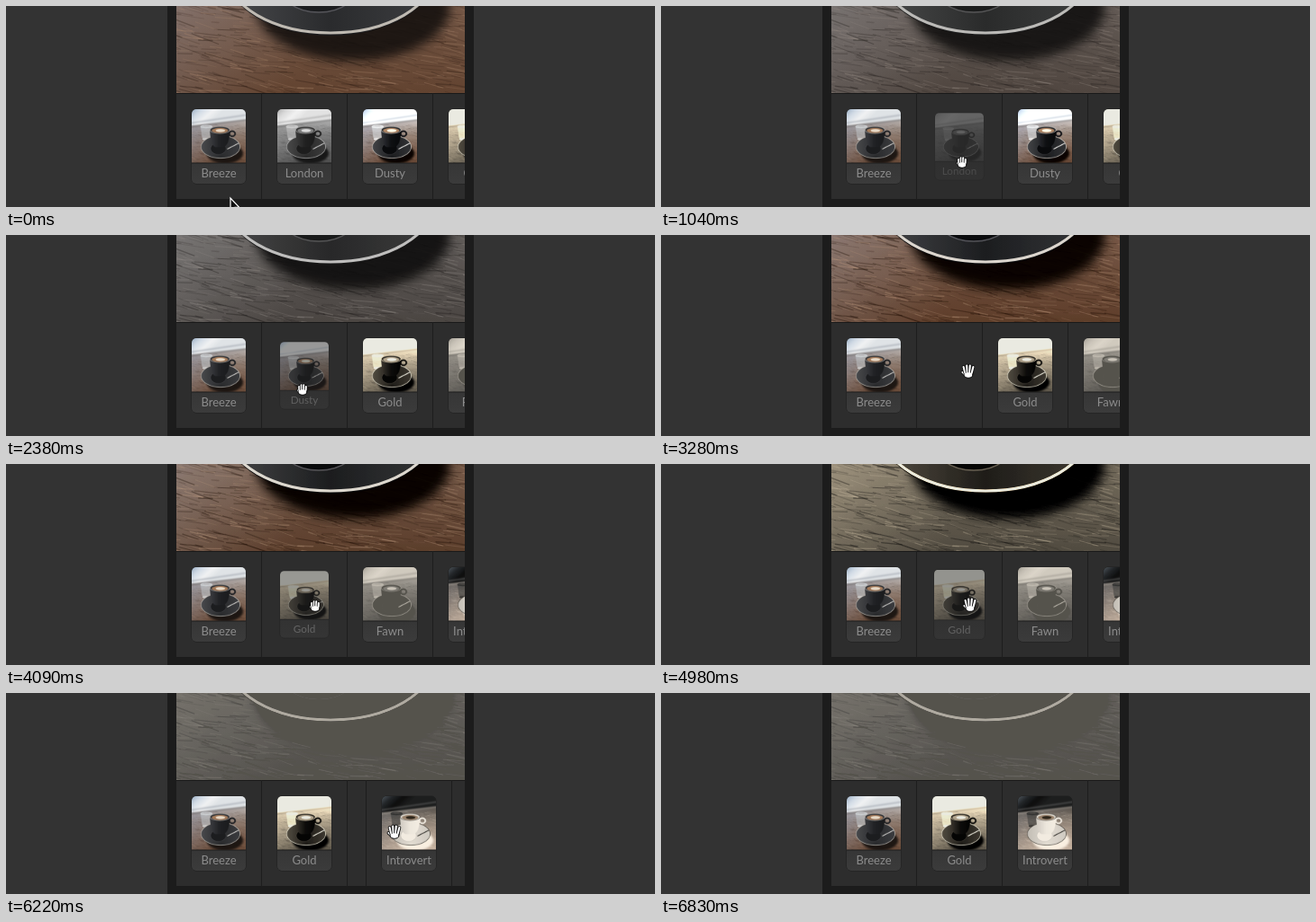
An HTML page with a canvas that plays this animation: 720x224 px, repeating every 7.36 s.

```html
<!DOCTYPE html>
<html lang="en">
<head>
<meta charset="utf-8">
<title>Photo filter strip</title>
<style>
  html, body { margin: 0; width: 100%; height: 100%; overflow: hidden; background: #333; }
  canvas { display: block; }
</style>
</head>
<body>
<canvas id="stage" width="720" height="224"></canvas>
<script>
const LOOP = 7360, LEFT = 189, TOP = 97, SLOT = 95, PHOTO_W = 320, PHOTO_H = 358;
const ctx = document.getElementById('stage').getContext('2d');
ctx.imageSmoothingQuality = 'high';

// press: picked; release: let go and kept; out: fades away; fold: its slot closes
const tiles = [
  { name: 'Breeze', filter: 'none' },
  { name: 'London', filter: 'grayscale(1)', press: 860, out: 1130, fold: 1346 },
  { name: 'Dusty', filter: 'brightness(1.08) contrast(1.2) saturate(.8)', press: 2290, out: 2920, fold: 3193 },
  { name: 'Gold', filter: 'grayscale(1) brightness(1.2) contrast(1.3) sepia(.6) brightness(.92)',
    press: 4010, release: 4940 },
  { name: 'Fawn', filter: 'grayscale(1) brightness(1.05) contrast(.8) sepia(.22) brightness(.9)', floor: '#55534c',
    press: 5610, out: 5870, fold: 6025 },
  { name: 'Introvert', filter: 'invert(1) hue-rotate(180deg) saturate(.6) sepia(.2)' }
];

// time, x, y of the pointer
const path = [
  [90, 254, 222], [360, 330, 168], [590, 330, 168], [680, 334, 173], [1660, 334, 173],
  [2020, 329, 171], [2920, 329, 171], [3190, 341, 152], [3370, 341, 152], [3460, 343, 157],
  [4980, 343, 157], [5430, 431, 155], [6310, 431, 155], [6740, 485, 197]
];

const clamp = v => Math.max(0, Math.min(1, v));
const ramp = (t, start, length) => start === undefined ? 0 : clamp((t - start) / length);
const ease = u => u * u * (3 - 2 * u);

function randomizer(seed) {
  return () => (seed = (seed * 16807) % 2147483647) / 2147483647;
}

function newCanvas() {
  const canvas = document.createElement('canvas');
  canvas.width = PHOTO_W;
  canvas.height = PHOTO_H;
  return [canvas, canvas.getContext('2d')];
}

function gradient(c, x0, y0, x1, y1, ...colors) {
  const g = c.createLinearGradient(x0, y0, x1, y1);
  colors.forEach((color, i) => g.addColorStop(i / (colors.length - 1), color));
  return g;
}

function polygon(c, points, fill) {
  c.beginPath();
  points.forEach(p => c.lineTo(...p));
  c.closePath();
  c.fillStyle = fill;
  c.fill();
}

function ellipse(c, x, y, rx, ry, fill, stroke, width) {
  c.beginPath();
  c.ellipse(x, y, rx, ry, 0, 0, 7);
  if (fill) { c.fillStyle = fill; c.fill(); }
  if (stroke) { c.strokeStyle = stroke; c.lineWidth = width; c.stroke(); }
}

function line(c, x0, y0, x1, y1, color, width) {
  c.beginPath();
  c.moveTo(x0, y0);
  c.lineTo(x1, y1);
  c.strokeStyle = color;
  c.lineWidth = width;
  c.stroke();
}

function paintPhoto() {
  const [canvas, c] = newCanvas();
  const rand = randomizer(71);
  c.lineCap = 'round';

  // table, paler towards the window on the left
  c.fillStyle = gradient(c, 0, 60, 0, PHOTO_H, '#b9b3b0', '#8d7a6e', '#755847', '#624330');
  c.fillRect(0, 0, PHOTO_W, PHOTO_H);
  c.fillStyle = gradient(c, 0, 150, 170, 290, 'rgba(150,152,165,.6)', 'rgba(150,140,140,0)');
  c.fillRect(0, 0, PHOTO_W, PHOTO_H);
  for (let i = 0; i < 1500; i++) {
    const x = rand() * 350 - 30, y = 90 + rand() * 270, length = 6 + rand() * 26;
    const shade = rand() < .6 ? '36,22,14' : '178,142,114';
    const rise = length * (rand() * .4);
    line(c, x, y, x + length, y + rise, `rgba(${shade},${.1 + rand() * .25})`, .5 + rand());
  }

  // window
  c.filter = 'blur(4px)';
  polygon(c, [[-10, -10], [330, -10], [330, 62], [-10, 100]],
    gradient(c, 0, 0, 90, 100, '#9db1c8', '#d3dce6', '#f1f2f3', '#dfe3e6'));
  line(c, -10, 84, 330, 34, '#a3a9b2', 6);
  line(c, -10, 104, 330, 64, '#6d6a6a', 5);
  c.filter = 'none';

  // glass
  polygon(c, [[52, 104], [122, 104], [112, 182], [64, 182]], 'rgba(205,212,218,.45)');
  ellipse(c, 87, 104, 35, 8, 'rgba(235,240,243,.4)', '#d5dbdf', 3);
  ellipse(c, 88, 178, 24, 8, 'rgba(235,235,235,.5)');

  // saucer with its shadow
  c.filter = 'blur(6px)';
  ellipse(c, 196, 262, 108, 60, 'rgba(22,17,15,.9)');
  c.filter = 'none';
  ellipse(c, 171, 225, 116, 69, '#1b1b1d');
  ellipse(c, 171, 224, 115, 67, gradient(c, 56, 0, 286, 0, '#48494c', '#2a2b2d', '#3c3d40'));
  ellipse(c, 171, 224, 115, 67, null, '#bfbab2', 3);
  ellipse(c, 158, 234, 46, 34, '#1c1d1f', '#55555a', 1.5);

  // cup
  ellipse(c, 240, 146, 17, 15, null, '#222326', 9);
  c.beginPath();
  c.moveTo(108, 124);
  c.bezierCurveTo(110, 190, 122, 220, 142, 226);
  c.lineTo(186, 226);
  c.bezierCurveTo(210, 218, 224, 190, 226, 124);
  c.fillStyle = gradient(c, 108, 0, 226, 0, '#3b3c40', '#202124', '#1a1b1d');
  c.fill();
  ellipse(c, 167, 124, 58, 21, '#35363a', '#a5a29d', 3);
  ellipse(c, 167, 127, 48, 15, '#a37a5a');
  ellipse(c, 170, 127, 28, 9, '#e6d8c6');

  // spoon
  line(c, 212, 236, 278, 202, '#cfcdca', 5);
  return canvas;
}

function develop(photo, { filter, floor }) {
  const [canvas, c] = newCanvas();
  c.filter = filter;
  c.drawImage(photo, 0, 0);
  c.filter = 'none';
  if (floor) {
    c.globalCompositeOperation = 'lighten';
    c.fillStyle = floor;
    c.fillRect(0, 0, PHOTO_W, PHOTO_H);
  }
  return canvas;
}

function rect(x, y, w, h, fill) {
  ctx.fillStyle = fill;
  ctx.fillRect(x, y, w, h);
}

function drawMain(t) {
  tiles.forEach((tile, i) => {
    ctx.globalAlpha = i ? ease(ramp(t, tile.press && tile.press + 30, 240)) : 1;
    ctx.drawImage(tile.image, LEFT, TOP - PHOTO_H);
  });
  ctx.globalAlpha = 1;
}

function drawTile(tile, x, t) {
  const back = ramp(t, tile.release, 120);
  const shrink = ramp(t, tile.press, 80) * (1 - back);
  const dim = ramp(t, tile.press, 130) * (1 - back);
  const alpha = (1 - .7 * dim) * (1 - ramp(t, tile.out, 150));
  if (!alpha) return;
  const scale = 1 - .1 * shrink;
  ctx.save();
  ctx.globalAlpha = alpha;
  ctx.translate(x + 47, 156.5);
  ctx.scale(scale, scale);
  ctx.beginPath();
  ctx.roundRect(-30, -41.5, 60, 83, 5);
  ctx.strokeStyle = '#1f1f1f';
  ctx.lineWidth = 1;
  ctx.stroke();
  ctx.clip();
  ctx.drawImage(tile.image, 0, 0, PHOTO_W, PHOTO_W, -30, -41.5, 60, 60);
  rect(-30, 18.5, 60, 24, gradient(ctx, 0, 18, 0, 42, '#363636', '#3b3b3b'));
  rect(-30, 18, 60, 1, '#1d1d1d');
  ctx.font = '13px Lato, sans-serif';
  ctx.textAlign = 'center';
  ctx.fillStyle = '#8c8c8c';
  ctx.fillText(tile.name, 0, 34.5);
  ctx.restore();
}

function drawStrip(t) {
  rect(LEFT, TOP, 320, 118, '#2d2d2d');
  rect(LEFT, TOP, 320, 1, '#191919');
  let x = LEFT;
  for (const tile of tiles) {
    const width = Math.round(SLOT * (1 - ease(ramp(t, tile.fold, 280))));
    drawTile(tile, x, t);
    x += width;
    if (width) rect(x - 1, TOP, 1, 118, '#1d1d1d');
  }
}

function pointerAt(t) {
  const next = path.findIndex(p => p[0] > t);
  if (next === 0) return path[0].slice(1);
  if (next < 0) return path.at(-1).slice(1);
  const [t0, x0, y0] = path[next - 1], [t1, x1, y1] = path[next];
  const u = ease((t - t0) / (t1 - t0));
  return [x0 + (x1 - x0) * u, y0 + (y1 - y0) * u];
}

function drawArrow() {
  polygon(ctx, [[-5, -8], [-5, 6], [-2, 3.2], [.2, 8], [2.6, 7], [.4, 2.4], [4.6, 2.2]], '#111');
  ctx.strokeStyle = '#fff';
  ctx.lineWidth = 1.2;
  ctx.stroke();
}

function drawHand(closed) {
  const reach = closed ? -3.6 : -6.5, spread = closed ? 1.05 : 1.5;
  const finger = (...ends) => {
    line(ctx, ...ends, '#111', 3.8);
    line(ctx, ...ends, '#fff', 2.1);
  };
  ctx.lineCap = 'round';
  ellipse(ctx, 0, 2.5, 5, 4.5, '#fff', '#111', 1.4);
  finger(-3, 4, closed ? -5 : -6.5, closed ? 2 : 1);
  [-3.6, -1.2, 1.2, 3.6].forEach((x, i) =>
    finger(x, 2, x * spread, reach + (i % 3 ? 0 : 1.6)));
  ellipse(ctx, 0, 4, 4.2, 2.8, '#fff');
  ctx.lineCap = 'butt';
}

function drawPointer(t) {
  if (t >= 6830) return;
  const closed = tiles.some(({ press, release, out }) => t >= press && t < (release ?? out + 60));
  ctx.save();
  ctx.translate(...pointerAt(t));
  if (t < 300 || t > 6550) drawArrow();
  else drawHand(closed);
  ctx.restore();
}

function render(t) {
  rect(0, 0, 720, 224, '#333');
  rect(179, 0, 340, 224, '#1c1c1c');
  ctx.save();
  ctx.beginPath();
  ctx.rect(LEFT, 0, 320, 215);
  ctx.clip();
  drawMain(t);
  drawStrip(t);
  ctx.restore();
  drawPointer(t);
}

const photo = paintPhoto();
tiles.forEach(tile => tile.image = develop(photo, tile));

const start = performance.now();
function tick() {
  render((performance.now() - start) % LOOP);
  requestAnimationFrame(tick);
}
tick();
</script>
</body>
</html>
```
